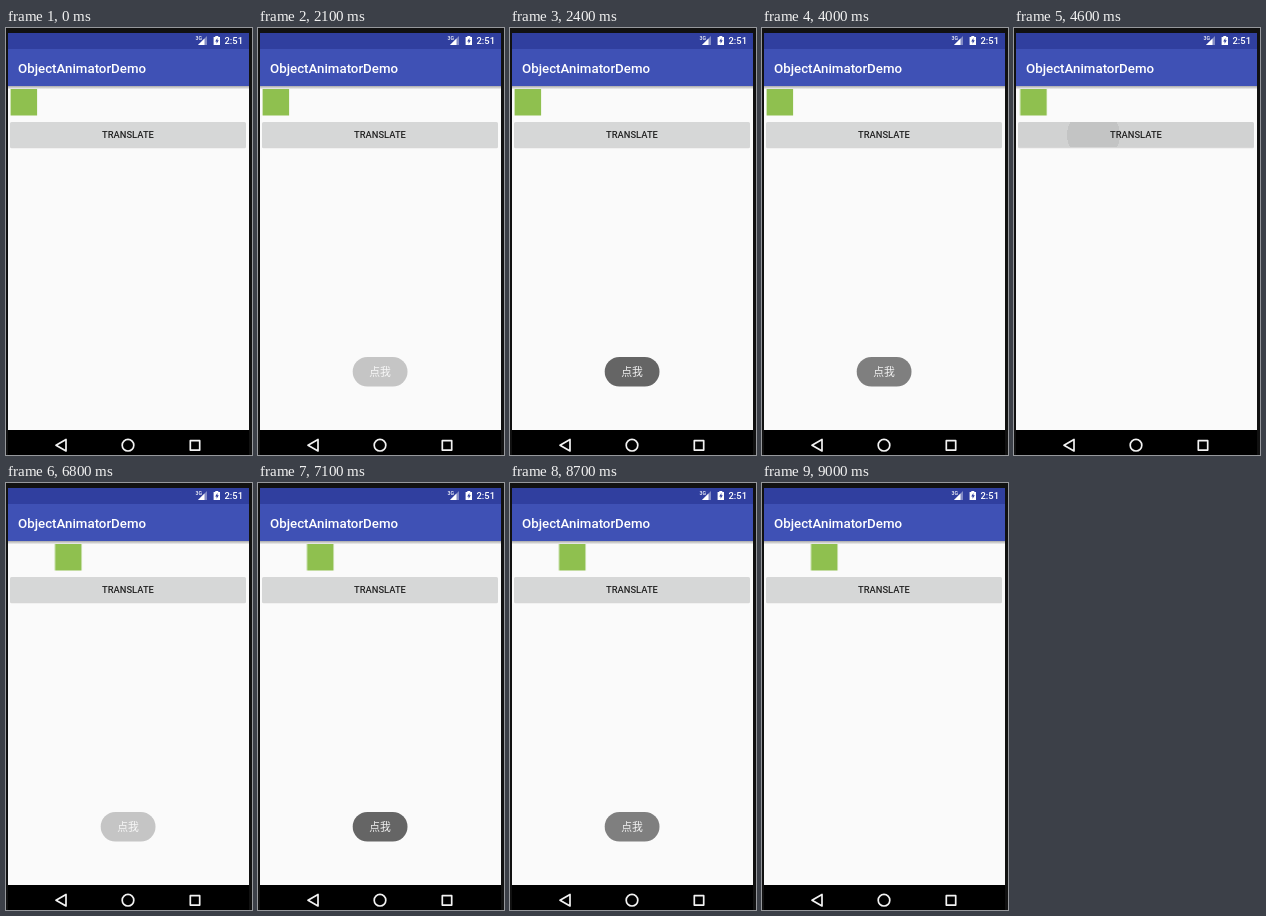
These frames come from a looping animation (246 px wide and 427 px high, 9.1 s). An HTML page:

```html
<!DOCTYPE html>
<html lang="en">
<head>
<meta charset="utf-8">
<title>Translate demo</title>
<style>
  html, body { margin: 0; width: 100%; height: 100%; overflow: hidden; background: #111; }
  svg { display: block; width: 246px; height: 427px; }
  text { font-family: Roboto, "Noto Sans", sans-serif; font-weight: 500; fill: #fff; }
  .nav { fill: none; stroke: #f2f2f2; stroke-width: 1.7; stroke-linejoin: round; }
  .icon, .toast, .ripple, .tint { animation: 9100ms step-end infinite; }
  .icon { animation-name: slide; }
  .toast { animation-name: toast; }
  .toast text { font: 400 10.8px "Noto Sans CJK SC", "Noto Sans CJK", sans-serif; fill: #f0f0f0; }
  .ripple { animation-name: ripple; transform-origin: 79.5px 107px; }
  .tint { animation-name: tint; }

  /* accelerate, then decelerate over one second */
  @keyframes slide {
    0% { transform: none; }
    50.54% { transform: translateX(1.6px); }
    51.64% { transform: translateX(5.1px); }
    52.74% { transform: translateX(10.3px); }
    53.84% { transform: translateX(16.7px); }
    54.94% { transform: translateX(23.6px); }
    56.04% { transform: translateX(30.4px); }
    57.14% { transform: translateX(36.4px); }
    58.24% { transform: translateX(40.9px); }
    59.34% { transform: translateX(43.7px); }
    60.43%, 100% { transform: translateX(44.4px); }
  }
  @keyframes toast {
    0%, 47.25%, 98.9%, 100% { opacity: 0; }
    23.07%, 74.72% { opacity: .355; }
    24.17%, 75.82% { opacity: .67; }
    25.27%, 76.92% { opacity: .9; }
    26.37%, 78.02% { opacity: 1; }
    43.95%, 95.6% { opacity: .82; }
    45.05%, 96.7% { opacity: .5; }
    46.15%, 97.8% { opacity: .2; }
  }
  @keyframes ripple {
    0%, 53.84%, 100% { opacity: 0; transform: scale(.1); }
    48.35% { opacity: .06; transform: scale(.35); }
    49.45% { opacity: .07; transform: scale(.65); }
    50.54% { opacity: .07; transform: scale(1); }
    51.64% { opacity: .06; transform: scale(2.4); }
    52.74% { opacity: .03; transform: scale(5); }
  }
  @keyframes tint {
    0%, 53.84%, 100% { opacity: 0; }
    48.35% { opacity: .015; }
    49.45%, 50.54% { opacity: .025; }
    51.64% { opacity: .02; }
    52.74% { opacity: .01; }
  }
</style>
</head>
<body>
<svg viewBox="0 0 246 427">
  <defs>
    <linearGradient id="shade" x2="0" y2="1">
      <stop stop-color="#000" stop-opacity=".32"/>
      <stop offset="1" stop-color="#000" stop-opacity="0"/>
    </linearGradient>
    <clipPath id="face"><rect x="4" y="94" width="236" height="25" rx="1.5"/></clipPath>
  </defs>

  <rect width="246" height="427" fill="#111"/>
  <rect x="2" y="5" width="241" height="397" fill="#fafafa"/>
  <rect x="2" y="402" width="241" height="25" fill="#000"/>

  <!-- status bar and title -->
  <rect x="2" y="5" width="241" height="16" fill="#303f9f"/>
  <rect x="2" y="21" width="241" height="37" fill="#3f51b5"/>
  <rect x="2" y="58" width="241" height="3.5" fill="url(#shade)"/>
  <text x="189.5" y="12" font-size="5.2">3G</text>
  <path d="M201 8V17H192Z" fill="#fff" opacity=".4"/>
  <path d="M198.5 10.5V17H192Z" fill="#fff"/>
  <path d="M209.3 8h3v1h1.7v8h-6.4V9h1.7z" fill="#fff"/>
  <path d="M211.4 10l-2.2 3.4h1.4v2.4l2.2-3.5h-1.4z" fill="#303f9f"/>
  <text x="218.5" y="16.3" font-size="9.4">2:51</text>
  <text x="12" y="44.5" font-size="13.3">ObjectAnimatorDemo</text>

  <rect class="icon" x="4.6" y="61" width="26.5" height="26.5" fill="#8fc04f"/>

  <!-- button -->
  <rect x="4" y="95" width="236" height="25.2" rx="1.5" fill="#000" opacity=".14"/>
  <g clip-path="url(#face)">
    <rect x="4" y="94" width="236" height="25" fill="#d6d7d7"/>
    <rect class="tint" x="4" y="94" width="236" height="25"/>
    <circle class="ripple" cx="79.5" cy="107" r="26.5"/>
  </g>
  <text x="122" y="110.2" font-size="9.35" text-anchor="middle" style="fill:#222">TRANSLATE</text>

  <g class="toast">
    <rect x="94.7" y="329" width="54.8" height="29.5" rx="14.75" fill="#656565"/>
    <text x="122" y="347.7" text-anchor="middle" lang="zh">点我</text>
  </g>

  <!-- navigation bar -->
  <g class="nav">
    <path d="M60 411.5V423L50 417.2Z"/>
    <circle cx="122" cy="417.2" r="5.8"/>
    <rect x="184.3" y="412.7" width="9.4" height="9.4"/>
  </g>
</svg>
</body>
</html>
```
